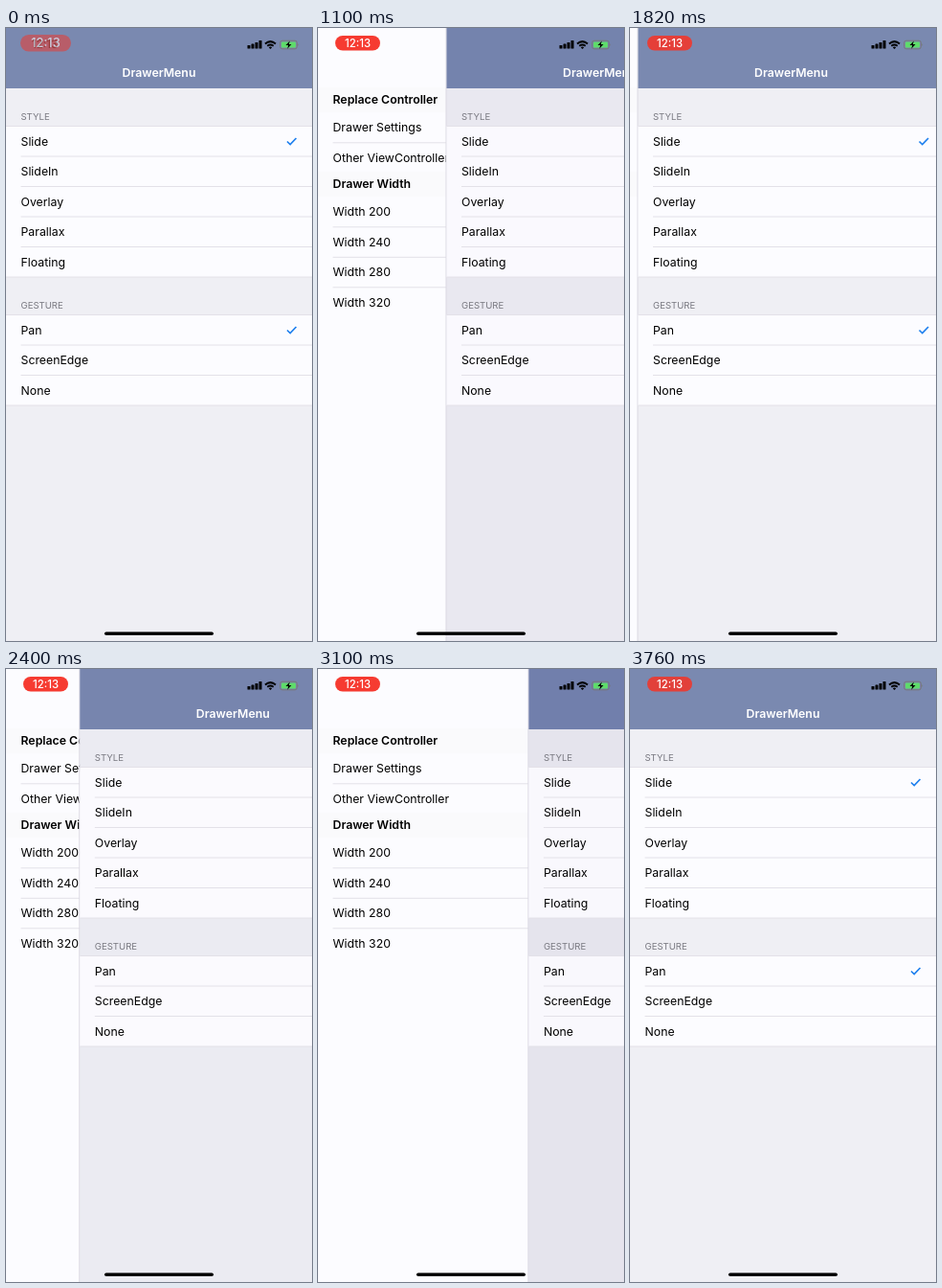
An HTML page that plays this animation: 320 by 640 pixels, repeating every 3860 ms.

```html
<!DOCTYPE html>
<html lang="en">
<head>
<meta charset="utf-8">
<style>
  html, body { margin: 0; width: 100%; height: 100%; overflow: hidden; background: #fcfcff; }
  svg { display: block; width: 320px; height: 640px; font: 12.3px Inter, sans-serif; }
  .bold { font-weight: 600; }
  .label { font-size: 9.6px; fill: #7a7a82; }
  .line { stroke: #e3e1e8; }
  .check { fill: none; stroke: #1f80ee; stroke-width: 1.7; }
  .bar { fill: color-mix(in srgb, #7a89b0, #6f7dab var(--open)); }
  .table { fill: color-mix(in srgb, #efeff4, #e3e2ec var(--open)); }
  .cells { fill: color-mix(in srgb, #fcfcff, #f8f7fd var(--open)); }
  .pill { fill: color-mix(in srgb, #e2403a, #f63b31 var(--lit)); }
  .time { font-size: 11.4px; font-weight: 500; text-anchor: middle; }
</style>
</head>
<body>
<svg id="stage" viewBox="0 0 320 640"></svg>
<script>
const ROW = 31.5, WIDTH = 256, LOOP = 3860;
const stage = document.getElementById('stage');

const text = (x, middle, label, cls = '') =>
  `<text x="${x}" y="${middle + 4.3}" class="${cls}">${label}</text>`;
const line = (x, y) => `<path class="line" d="M${x} ${y}H320"/>`;
const rows = (top, labels) => labels.map((label, i) =>
  text(15.5, top + ROW * (i + .5), label) + (i ? line(15.5, top + ROW * i) : '')).join('');

function group(top, title, labels) {
  const height = ROW * labels.length;
  return text(15.5, top - 11.3, title, 'label') +
    `<rect class="cells" y="${top}" width="320" height="${height}"/>` +
    line(0, top) + line(0, top + height) + rows(top, labels) +
    `<path class="check" d="M294 ${top + 16}l3.2 3 6.3-6.5"/>`;
}

const section = (top, title, labels) =>
  `<rect y="${top}" width="320" height="26" fill="#fafafc"/>` +
  text(15.5, top + 13, title, 'bold') + rows(top + 26.3, labels);

const signal = [3.5, 5, 6.5, 8.5].map((h, i) =>
  `<rect x="${252.5 + 4 * i}" y="${21.5 - h}" width="3" height="${h}" rx=".6"/>`).join('');

stage.innerHTML = `
  <rect width="320" height="640" fill="#fcfcff"/>
  ${section(62, 'Replace Controller', ['Drawer Settings', 'Other ViewController'])}
  ${section(150, 'Drawer Width', [200, 240, 280, 320].map(w => 'Width ' + w))}
  <g id="content">
    <rect x="-1" width="1.5" height="640" fill="#dad8e2"/>
    <rect class="table" width="320" height="640"/>
    <rect class="bar" width="320" height="63"/>
    <text x="160" y="51.4" class="bold" fill="#fff" text-anchor="middle">DrawerMenu</text>
    ${group(102.5, 'STYLE', ['Slide', 'SlideIn', 'Overlay', 'Parallax', 'Floating'])}
    ${group(299.5, 'GESTURE', ['Pan', 'ScreenEdge', 'None'])}
  </g>
  <text id="clock" class="time" x="40.5" y="20.5" fill="#27303c">12:13</text>
  <g id="pill">
    <rect class="pill" x="18" y="8" width="47" height="15.5" rx="7.75"/>
    <text class="time" x="41.5" y="19.6" fill="#fff">12:13</text>
  </g>
  ${signal}
  <g fill="none" stroke="#000" stroke-width="2">
    <path d="M271 16.4q5.5-4.6 11 0M273.3 18.7q3.2-2.5 6.4 0"/>
    <rect x="286.7" y="13.2" width="17.6" height="8.6" rx="2.2" stroke="#777" stroke-width="1"/>
  </g>
  <path d="M274.8 20.2q1.7-1.2 3.4 0l-1.7 1.8z"/>
  <rect x="288" y="14.5" width="15" height="6" rx="1" fill="#5fdc6a"/>
  <path d="M305.4 16v3q1.4-1.5 0-3" fill="#777"/>
  <path d="M296.8 13.5l-4.3 4.6h2.7l-1 3.7 4.3-4.8h-2.7z"/>
  <rect x="103" y="630.4" width="114" height="3.6" rx="1.8"/>`;

const [content, clock, pill] = ['content', 'clock', 'pill'].map(id => document.getElementById(id));

// Turning points of the finger dragging the content to and fro: [tick, openness]
const turns = [[1, 0], [12, 1], [19.5, 1], [28.8, 0], [33, 1], [39.3, 0], [45.3, 1], [51, 0],
  [56.4, 1], [62.4, 0], [69.8, 1], [75, .08], [77, .08], [81, 0]];
const clamp = v => Math.min(1, Math.max(0, v));

// Three ticks per 140 ms, lasting 20, 20 and 100 ms
function tickAt(ms) {
  const shifted = ms + 20, rest = shifted % 140;
  return Math.min(81, 3 * Math.floor(shifted / 140) + (rest < 20 ? 0 : rest < 40 ? 1 : 2));
}

function openness(tick) {
  const next = Math.max(1, turns.findIndex(([end]) => tick <= end));
  const [[from, a], [to, b]] = [turns[next - 1], turns[next]];
  return a + (b - a) * (1 - Math.cos(Math.PI * (tick - from) / (to - from))) / 2;
}

function draw(now) {
  const tick = tickAt(now % LOOP), open = openness(tick);
  content.setAttribute('transform', `translate(${open * WIDTH})`);
  stage.style.setProperty('--open', open * 100 + '%');
  stage.style.setProperty('--lit', clamp(open * 4) * 100 + '%');

  const shown = clamp(.6 + (tick - 1) * .2), scale = 1 + (1 - shown) * .32;
  pill.setAttribute('opacity', shown);
  pill.setAttribute('transform', `translate(41.5 15.7) scale(${scale}) translate(-41.5 -15.7)`);
  clock.setAttribute('opacity', shown < 1 ? 1 : 0);
  requestAnimationFrame(draw);
}
requestAnimationFrame(draw);
</script>
</body>
</html>
```
